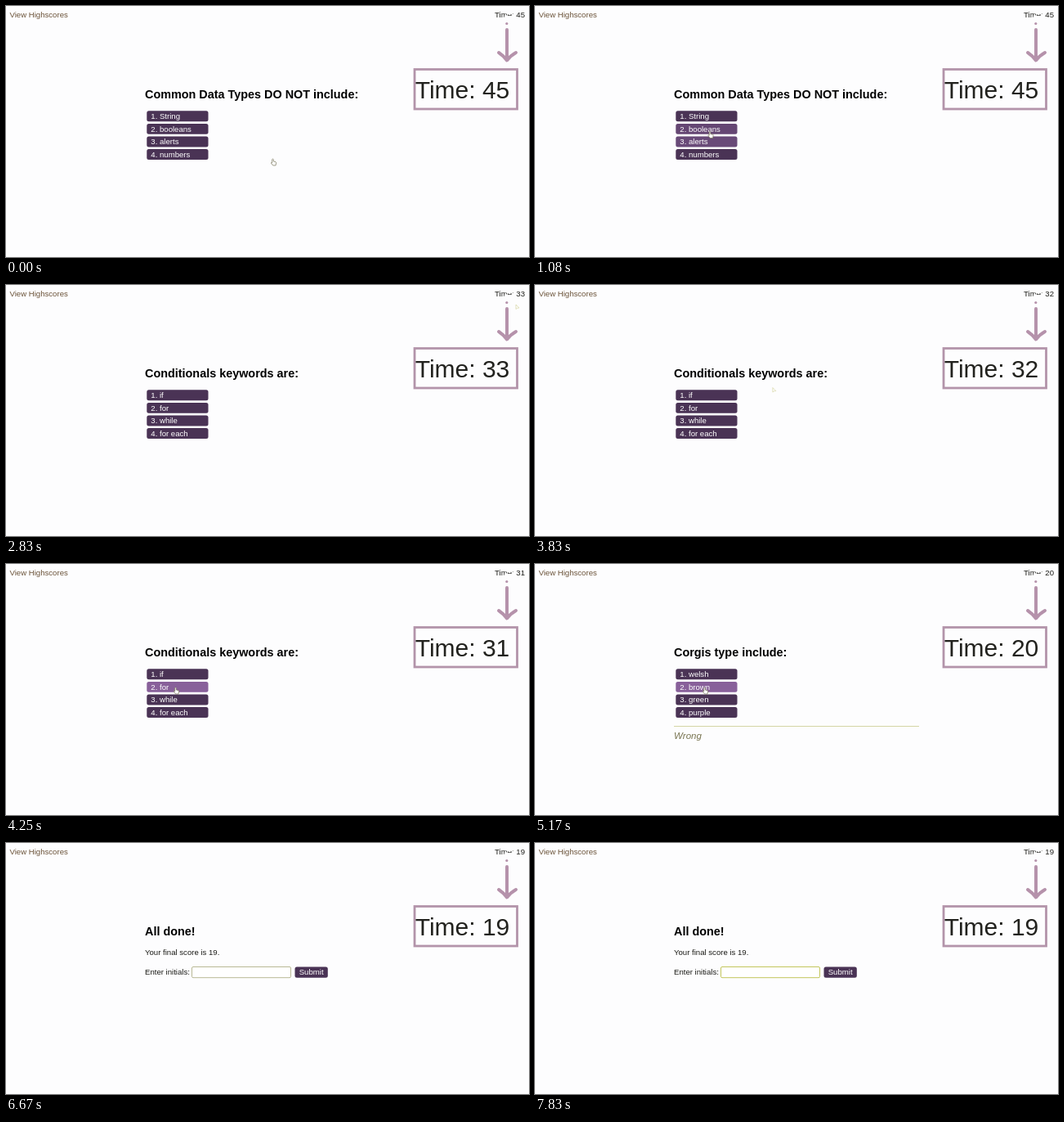
An HTML page that plays this animation: 640x307 px, repeating every 8 s.

```html
<!DOCTYPE html>
<html lang="en">
<head>
<meta charset="utf-8">
<title>Code quiz</title>
<style>
  html, body { margin: 0; width: 100%; height: 100%; overflow: hidden; background: #fdfdfe; }
  svg { display: block; width: 100%; height: 100%; }
  text { font: 9.6px "Liberation Sans", Arial, sans-serif; fill: #1c1c18; white-space: pre; }
  .title { font-size: 14.4px; font-weight: bold; fill: #000; }
  .link { fill: #6a5238; }
  .label { fill: #fff; }
  .big { font-size: 30px; fill: #22221e; }
  .note { font-size: 11.5px; font-style: italic; fill: #77734f; }
  .arrow { fill: none; stroke: #b592ab; stroke-width: 4; stroke-linecap: round; stroke-linejoin: round; }
  .hide { visibility: hidden; }
</style>
</head>
<body>
<svg viewBox="0 0 640 307">
  <text class="link" x="4.5" y="13.5">View Highscores</text>
  <text id="clock" x="598" y="13.5"></text>

  <path fill="#fdfdfe" d="M611 5H624.3V9.6L619 9.4 615 10.5 611 9ZM608.5 15L611.5 11 616 12.6 624 12V16Z"/>
  <path class="arrow" d="M613 29V65M603 57Q609 61 613 66.5Q617 61 624 57"/>
  <circle cx="612.8" cy="21.5" r="1.6" fill="#b592ab"/>
  <rect x="500" y="77.5" width="125.5" height="48.5" fill="#fdfdfe" stroke="#b394aa" stroke-width="2.8"/>
  <text id="bigClock" class="big" x="500.7" y="113"></text>

  <text id="title" class="title" x="170" y="113"></text>
  <g id="answers"></g>

  <g id="done">
    <text x="170" y="137">Your final score is 19.</text>
    <text x="170" y="161.3">Enter initials:</text>
    <rect id="field" x="227.5" y="151.5" width="121" height="13.2" rx="1.5" fill="#fff"/>
    <rect x="353.5" y="151.5" width="40.3" height="13.2" rx="2.5" fill="#4a3355"/>
    <text class="label" x="358.7" y="161.4">Submit</text>
  </g>

  <g id="feedback">
    <path d="M170 198.5H470" stroke="#d4d6a6"/>
    <text id="note" class="note" x="170" y="214"></text>
  </g>

  <g id="cursor">
    <path id="hand" fill="#fff" stroke="#77745a" stroke-width=".7" stroke-linejoin="round"
      d="M-.8 .6Q0-.5.8.6V3L3.6 3.7Q4.3 4 4.1 5L3.5 8H.2L-2.2 5Q-2 3.8-.8 4.8Z"/>
    <path id="pointer" fill="#fff" stroke="#cfcd92" stroke-width=".6" d="M0 0V5.5L1.4 4.3 3.9 4Z"/>
  </g>
</svg>
<script>
const LOOP = 8000, FPS = 12, FADE = 280;
const BASE = [74, 51, 85], HOVER = [136, 96, 154];

const screens = [
  { at: 0, title: "Common Data Types DO NOT include:", answers: ["String", "booleans", "alerts", "numbers"] },
  { at: 1410, title: "Conditionals keywords are:", answers: ["if", "for", "while", "for each"] },
  { at: 4410, title: "Corgis type include:", answers: ["welsh", "brown", "green", "purple"] },
  { at: 6160, title: "All done!" }
];
const clock = [[0, 45], [1160, 44], [1410, 34], [1990, 33], [3080, 32], [4160, 31], [4410, 21], [5160, 20], [6160, 19]];
const notes = [[0, ""], [1410, "Wrong"], [2490, ""], [4410, "Wrong"], [5490, ""], [6160, "Correct"], [6660, ""]];
const path = [
  [0, 326.5, 187], [60, 326.5, 187], [833, 218, 165], [917, 218, 164], [1000, 214, 155],
  [1083, 214, 153.5], [1750, 214, 153.5], [1917, 204, 149.5], [2050, 204, 149.5],
  [2580, 624, 24], [3420, 624, 24], [4000, 207.5, 151], [5420, 207.5, 151], [5583, 216, 137], [8000, 216, 137]
];

const $ = id => document.getElementById(id);
const latest = (list, t) => list.filter(e => e[0] <= t).pop()[1];
const screenAt = t => screens.filter(s => s.at <= t).pop();
const show = (node, on) => node.classList.toggle("hide", !on);
const setText = (node, s) => { if (node.textContent !== s) node.textContent = s; };
const top4 = i => 128.3 + i * 15.6;

function make(tag, attrs, parent) {
  const node = document.createElementNS("http://www.w3.org/2000/svg", tag);
  for (const k in attrs) node.setAttribute(k, attrs[k]);
  return parent.appendChild(node);
}

const buttons = [0, 1, 2, 3].map(i => ({
  box: make("rect", { x: 172.3, y: top4(i), width: 75.2, height: 12.9, rx: 2.5 }, $("answers")),
  label: make("text", { class: "label", x: 177.3, y: top4(i) + 9.8 }, $("answers"))
}));

function cursorAt(t) {
  const i = Math.max(1, path.findIndex(p => p[0] >= t));
  const [t0, x0, y0] = path[i - 1], [t1, x1, y1] = path[i];
  const k = (t - t0) / (t1 - t0), e = k * k * (3 - 2 * k);
  return [x0 + (x1 - x0) * e, y0 + (y1 - y0) * e];
}

function hovered(t) {
  const [x, y] = cursorAt(Math.max(0, t));
  if (x < 172 || x > 248) return -1;
  return [0, 1, 2, 3].findIndex(i => y >= top4(i) && y <= top4(i) + 13);
}

// Share of the last FADE ms spent on each button
function glow(t) {
  const sum = [0, 0, 0, 0], n = 14;
  for (let k = 0; k < n; k++) {
    const i = hovered(t - k * FADE / n);
    if (i >= 0) sum[i] += 1 / n;
  }
  return sum;
}

function draw(t) {
  const { title, answers } = screenAt(t);
  const time = "Time: " + latest(clock, t), note = latest(notes, t);
  setText($("clock"), time);
  setText($("bigClock"), time);
  setText($("title"), title);
  setText($("note"), note);
  show($("feedback"), note);
  $("feedback").setAttribute("transform", `translate(0 ${answers ? 0 : -21})`);
  show($("answers"), answers);
  show($("done"), !answers);
  $("field").setAttribute("stroke", t < 7740 ? "#b9b995" : "#c3c65c");

  if (answers) {
    const w = glow(t);
    buttons.forEach(({ box, label }, i) => {
      const rgb = BASE.map((c, j) => Math.round(c + (HOVER[j] - c) * w[i]));
      box.setAttribute("fill", `rgb(${rgb})`);
      setText(label, `${i + 1}. ${answers[i]}`);
    });
  }

  const [x, y] = cursorAt(t), hand = t < 1000 || hovered(t) >= 0;
  $("cursor").setAttribute("transform", `translate(${x} ${y})`);
  const on = t < 6660;
  show($("hand"), on && hand);
  show($("pointer"), on && !hand);
}

const start = performance.now();
function tick() {
  const t = Math.max(0, performance.now() - start) % LOOP;
  draw(Math.floor((t + 4) * FPS / 1000) % (LOOP * FPS / 1000) * 1000 / FPS);
  requestAnimationFrame(tick);
}
tick();
</script>
</body>
</html>
```
